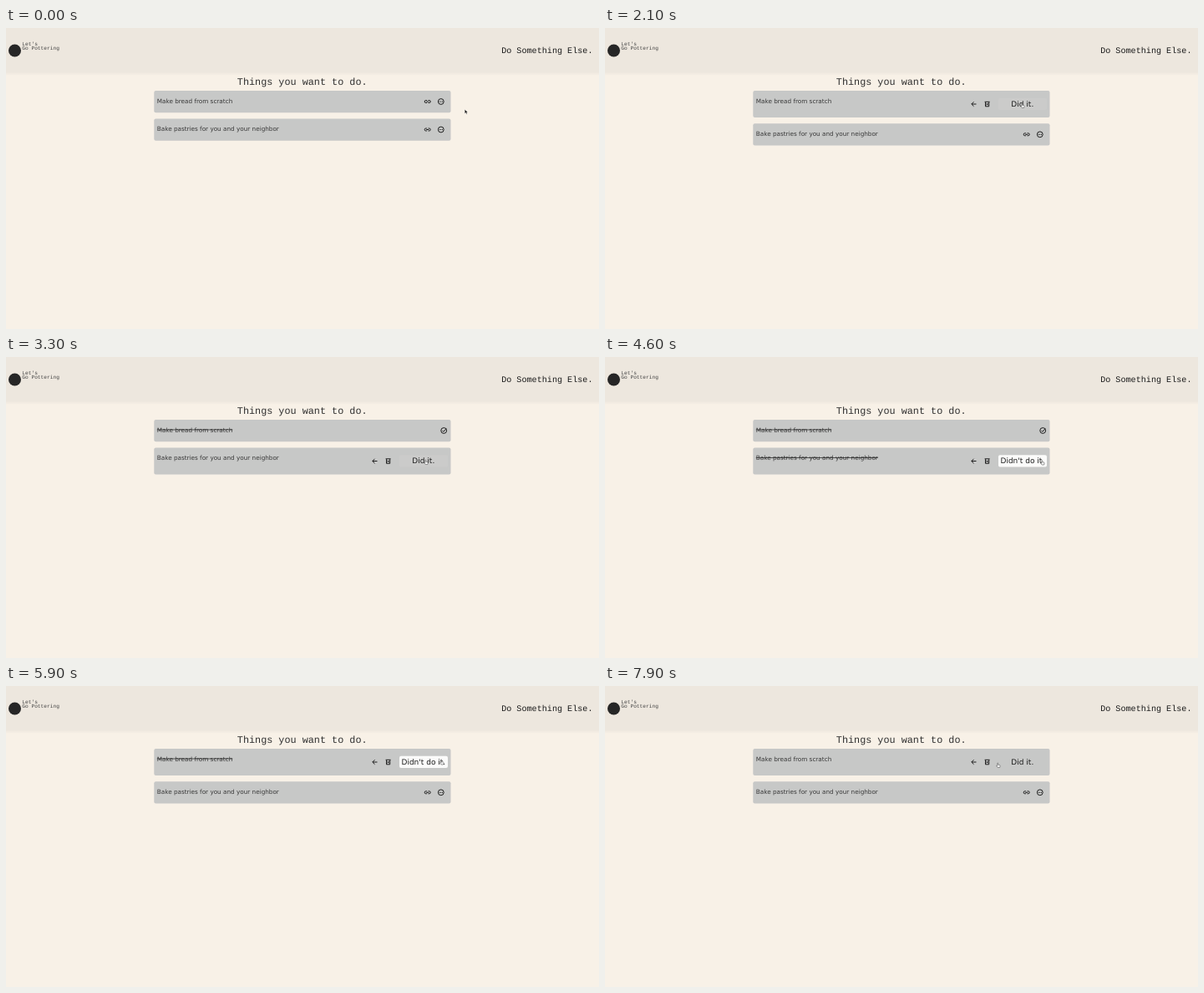
These frames come from a looping animation (710x360 px, 8000 ms). An HTML page:

```html
<!DOCTYPE html>
<html lang="en">
<head>
<meta charset="utf-8">
<title>To-do list</title>
<style>
  html, body { margin: 0; width: 100%; height: 100%; overflow: hidden; background: #f8f1e7; }
  svg { display: block; width: 710px; height: 360px; }
  text { font-family: "DejaVu Sans", sans-serif; fill: #383838; text-rendering: geometricPrecision; }
  .mono { font-family: "Liberation Mono", "Courier New", monospace; fill: #1b1b1b; }
  .title { font-size: 11.8px; fill: #303030; }
  .nav { font-size: 10.15px; }
  .brand { font-size: 6.2px; fill: #444; }
  .task { font-size: 7.25px; }
  .label { font-size: 9px; fill: #1c1c1c; }
  .icon { fill: none; stroke: #1c1c1c; }
  .icon .solid { fill: #1c1c1c; stroke: none; }
</style>
</head>
<body>
<svg viewBox="0 0 710 360">
  <defs>
    <linearGradient id="shade" x2="0" y2="1">
      <stop offset="0" stop-color="#000" stop-opacity=".04"/>
      <stop offset="1" stop-color="#000" stop-opacity="0"/>
    </linearGradient>
  </defs>
  <rect width="710" height="360" fill="#f8f1e7"/>
  <rect width="710" height="53" fill="#ede7de"/>
  <rect y="53" width="710" height="4" fill="url(#shade)"/>
  <circle cx="10.5" cy="27" r="7.5" fill="#262626"/>
  <text class="mono brand" x="19.3" y="20.6">Let's</text>
  <text class="mono brand" x="19.3" y="26.4">Go Pottering</text>
  <text class="mono nav" x="702.5" y="30.4" text-anchor="end">Do Something Else.</text>
  <text class="mono title" x="354.7" y="68.3" text-anchor="middle">Things you want to do.</text>
  <g id="list"></g>
  <g id="cursor"></g>
</svg>
<script>
const LOOP = 8000, STEP = 100, TRAVEL = 400;
const LEFT = 177.3, RIGHT = 532.5, TOP = 75, GAP = 7.3;
const CLOSED = 26.2, OPEN = 32;

const tasks = ['Make bread from scratch', 'Bake pastries for you and your neighbor'];

// Where the pointer rests for each action, and what its click does to the list
const actions = {
  open: { x: 520, dy: 15, run: (s, i) => s.open = i },
  tick: { x: 500, dy: 18, run: (s, i) => s.done[i] = true },
  undo: { x: 524, dy: 18, run: (s, i) => s.done[i] = false },
  back: { x: 442, dy: 18, run: s => s.open = -1 },
  rest: { x: 471, dy: 20, run: () => {} }
};

const clicks = [
  { at: 700, task: 0, act: 'open' },
  { at: 2200, task: 0, act: 'tick' },
  { at: 2600, task: 0, act: 'back' },
  { at: 3000, task: 1, act: 'open' },
  { at: 3700, task: 1, act: 'tick' },
  { at: 4700, task: 1, act: 'undo' },
  { at: 5100, task: 1, act: 'back' },
  { at: 5700, task: 0, act: 'open' },
  { at: 6000, task: 0, act: 'undo' },
  { at: 6400, task: 0, act: 'back' },
  { at: 7100, task: 0, act: 'open' },
  { at: LOOP, task: 0, act: 'rest' }
];

const icons = {
  link: `<path d="M-.8-1.5H-2A1.5 1.5 0 0 0-2 1.5H-.8M.8-1.5H2A1.5 1.5 0 0 1 2 1.5H.8M-1.5 0H1.5"/>`,
  dots: `<circle r="3.4"/><g class="solid"><circle cx="-1.7" r=".6"/><circle r=".6"/><circle cx="1.7" r=".6"/></g>`,
  check: `<circle r="3.4"/><path d="M-1.7 0L-.4 1.3L3-2.3"/>`,
  back: `<path d="M3 0H-2.6M0-2.7L-2.7 0L0 2.7"/>`,
  bin: `<path d="M-3-2.7H3M-2.1-2.3V2.8H2.1V-2.3M-1-.9L1 1.3M1-.9L-1 1.3"/>`
};

const arrow = `<path d="M-1.2-2.6V2.2L0 1.2L.8 3.1L1.7 2.7L.9 .9L2.3 .7Z" fill="#111" stroke="#fff" stroke-width=".35"/>`;
const hand = `<path d="M-1.2-2.8Q-.7-3.3-.3-2.7V-.8L1.6-.5Q2.3-.3 2.1 .6L1.7 2.5H-.9L-2.4 .6Q-2.4-.2-1.2 .4Z"
  fill="#f4f4f4" stroke="#444" stroke-width=".5" stroke-linejoin="round"/>`;

const list = document.getElementById('list');
const cursor = document.getElementById('cursor');

const ease = p => p * p * (3 - 2 * p);
const mix = (a, b, p) => a + (b - a) * p;
const heightOf = (i, open) => i === open ? OPEN : CLOSED;
const topOf = (i, open) => TOP + (i ? heightOf(0, open) + GAP : 0);

function stateAt(t) {
  const state = { open: -1, done: [false, false] };
  for (const c of clicks) if (c.at <= t) actions[c.act].run(state, c.task);
  return state;
}

// Each trip starts right after one click and ends at the spot of the next
function pointerAt(t) {
  const next = clicks.findIndex(c => c.at > t);
  const spot = c => ({ x: actions[c.act].x, y: topOf(c.task, -1) + actions[c.act].dy });
  const from = next ? spot(clicks[next - 1]) : { x: 550.5, y: 100 };
  const to = spot(clicks[next]);
  const left = next ? clicks[next - 1].at : 0;
  const p = ease(Math.min(1, (t - left) / TRAVEL));
  return { x: mix(from.x, to.x, p), y: mix(from.y, to.y, p) };
}

function icon(name, x, y, pointer) {
  const scale = Math.hypot(pointer.x - x, pointer.y - y) < 5.5 ? 1.3 : 1;
  return `<g class="icon" transform="translate(${x} ${y}) scale(${scale})">${icons[name]}</g>`;
}

function button(top, done, { x, y }) {
  const hover = x > 472 && x < 529 && y > top + 9 && y < top + 23;
  const fill = done ? '#fbfbfa' : hover ? '#cbcbca' : 'none';
  return `<rect x="471" y="${top + 8.7}" width="58" height="14.4" rx="2" fill="${fill}"/>
    <text class="label" x="499.8" y="${top + 18.5}" text-anchor="middle">${done ? "Didn't do it." : 'Did it.'}</text>`;
}

function card(text, top, open, done, pointer) {
  const tools = open ? [['back', 441.5], ['bin', 457.6]]
    : done ? [['check', 524.2]]
    : [['link', 504.7], ['dots', 520.8]];
  const y = top + (open ? 16 : 13);
  return `<rect x="${LEFT}" y="${top}" width="${RIGHT - LEFT}" height="${open ? OPEN : CLOSED}" rx="2" fill="#c7c8c7"/>
    <text class="task${done ? ' done' : ''}" x="180.8" y="${top + 14.8}">${text}</text>`
    + tools.map(([name, x]) => icon(name, x, y, pointer)).join('')
    + (open ? button(top, done, pointer) : '');
}

function strike(label) {
  const line = document.createElementNS('http://www.w3.org/2000/svg', 'path');
  const y = label.getAttribute('y') - 2.8;
  line.setAttribute('d', `M180.8 ${y}h${label.getComputedTextLength()}`);
  line.setAttribute('stroke', '#2a2a2a');
  line.setAttribute('stroke-width', .8);
  label.after(line);
}

function draw(t) {
  const { open, done } = stateAt(t);
  const pointer = pointerAt(t);
  list.innerHTML = tasks.map((text, i) => card(text, topOf(i, open), i === open, done[i], pointer)).join('');
  list.querySelectorAll('.done').forEach(strike);
  const over = pointer.x < RIGHT && tasks.some((_, i) => {
    const dy = pointer.y - topOf(i, open);
    return dy > 0 && dy < heightOf(i, open);
  });
  cursor.innerHTML = over ? hand : arrow;
  cursor.setAttribute('transform', `translate(${pointer.x} ${pointer.y})`);
}

let last = 0;
const start = performance.now();
function tick(now) {
  const t = Math.floor((Math.max(0, now - start) % LOOP) / STEP) * STEP;
  if (t !== last) draw(last = t);
  requestAnimationFrame(tick);
}
draw(0);
requestAnimationFrame(tick);
</script>
</body>
</html>
```
